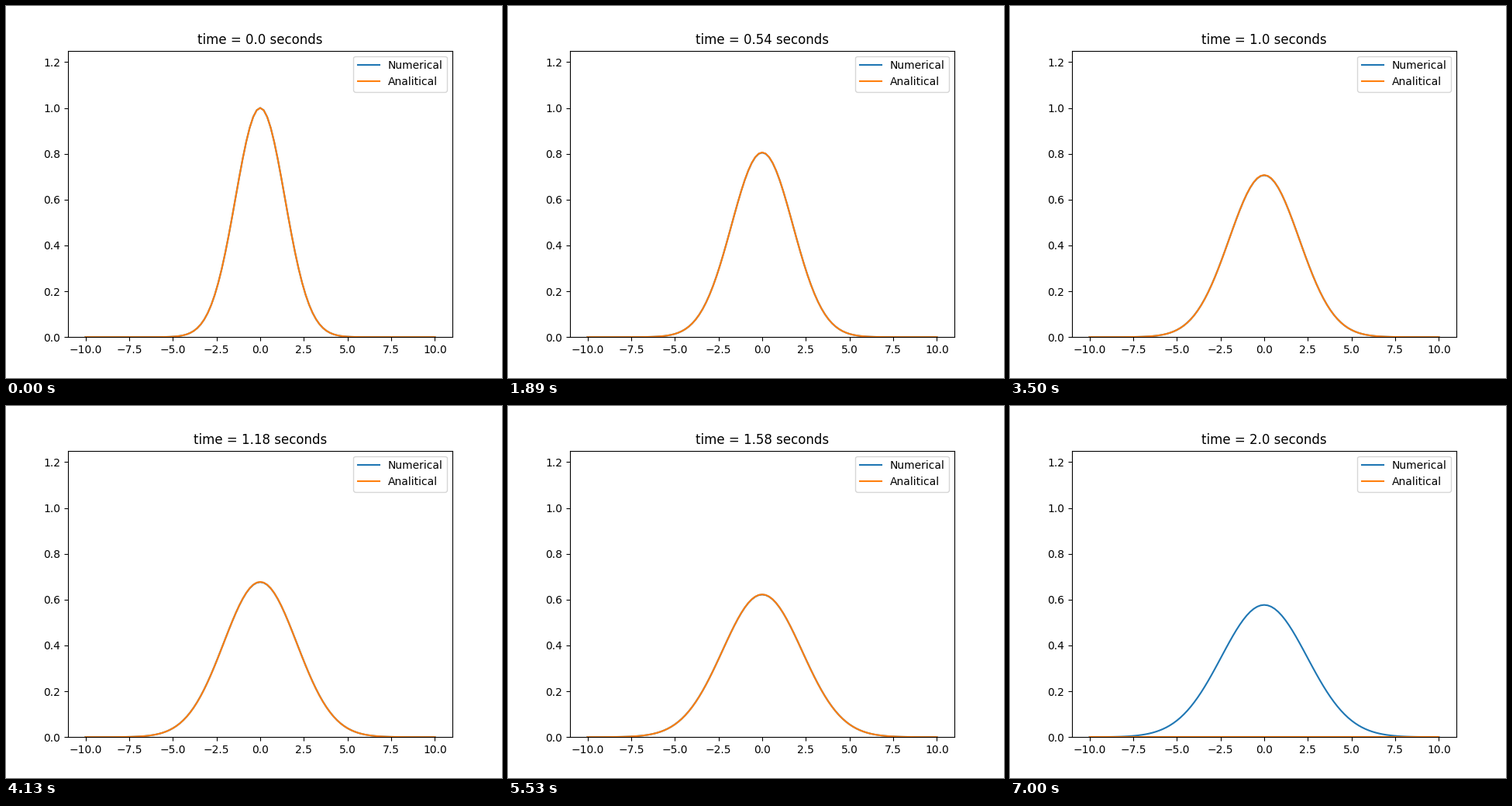
Write a matplotlib script that moves like this. It is 640 by 480 pixels and loops after 7.07 s.

```python
import numpy as np
import matplotlib.pyplot as plt
from matplotlib.animation import FuncAnimation

STEPS = 101
DT = 0.02
x = np.linspace(-10, 10, 101)
dx = x[1] - x[0]


def exact(t):
    return np.exp(-x**2 / (4 * (1 + t))) / np.sqrt(1 + t)


def solve():
    """Explicit finite differences for the heat equation."""
    u = np.zeros((STEPS, x.size))
    u[0] = exact(0)
    r = DT / dx**2
    for n in range(STEPS - 1):
        u[n + 1, 1:-1] = u[n, 1:-1] + r * (u[n, 2:] - 2 * u[n, 1:-1] + u[n, :-2])
    return u


numerical = solve()
analytical = np.zeros_like(numerical)
for n in range(STEPS - 1):  # the last row stays zero
    analytical[n] = exact(n * DT)

fig, ax = plt.subplots(figsize=(6.4, 4.8), dpi=100)
line_num, = ax.plot(x, numerical[0], label="Numerical")
line_ana, = ax.plot(x, analytical[0], label="Analitical")
ax.set_ylim(0, 1.25)
ax.legend(loc="upper right")
title = ax.set_title("")


def update(n):
    line_num.set_ydata(numerical[n])
    line_ana.set_ydata(analytical[n])
    title.set_text(f"time = {round(n * DT, 2)} seconds")
    return line_num, line_ana, title


anim = FuncAnimation(fig, update, frames=STEPS, interval=70,
                     init_func=lambda: update(0), repeat=True, repeat_delay=0)
plt.show()
```
